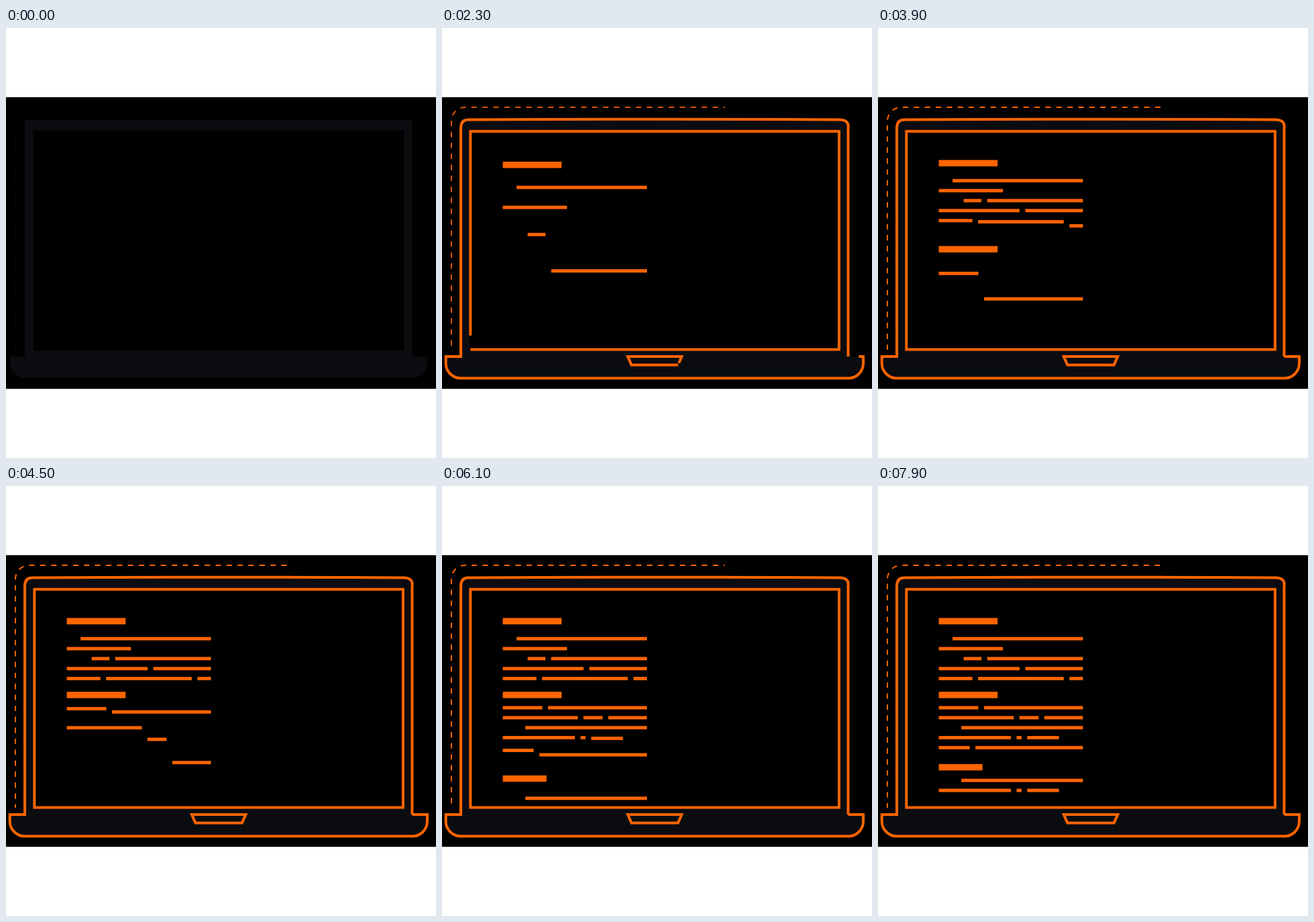
Write an HTML page that moves like this. It is 640x640 px and loops after 8 s.

```html
<!DOCTYPE html>
<html lang="en">
<head>
<meta charset="utf-8">
<title>Laptop line drawing</title>
<style>
  html, body { margin: 0; height: 100%; overflow: hidden; background: #fff; }
  svg { display: block; width: 100vw; height: 100vh; }
  .line { fill: none; stroke: #ff6400; stroke-width: 4; }
  #dashes { stroke-width: 2; stroke-dasharray: 8.16; }
  #bars { fill: #ff6400; }
  .panel { fill: #0b0c10; }
</style>
</head>
<body>
<svg viewBox="0 0 640 640">
  <clipPath id="screen"><rect x="41" y="152.5" width="551" height="327"/></clipPath>
  <rect y="103" width="640" height="434"/>
  <path id="dashes" class="line" d="M421.2 118H34.5A20.5 20.5 0 0 0 14 138.5V479"/>
  <path class="panel" d="M28 136.5H604.5V489H627V499A22 22 0 0 1 605 521H28A22 22 0 0 1 6 499V489H28Z"/>
  <rect x="41" y="152.5" width="551" height="327"/>
  <g id="bars" clip-path="url(#screen)"></g>
  <path class="line trim" data-start="647" pathLength="1"
    d="M604.5 489V149Q606.5 137 592 136.5Q320 134.8 39 136.5Q28 136.5 28 149V489H5.7V499A22.3 22.3 0 0 0 28 521.3H605A22 22.3 0 0 0 627 499V489H604.5"/>
  <path class="line trim" data-start="721" pathLength="1" d="M42.3 478.5H591V153.8H42.3Z"/>
  <path class="line trim" data-start="792" pathLength="1" d="M351.3 501.5H282L276.5 489H356.8Z"/>
</svg>
<script>
const LOOP = 8000, STEP = 100, FRAME = 40;
const DRAW_TIME = 2070;
const BAR_START = 1346, BAR_STAGGER = 200, BAR_TIME = 1190, BAR_FROM = 500;
const DASH_PERIOD = 16.32, DASH_CYCLE = 3850;
const LEFT = 90.5, RIGHT = 305, WORD_GAP = 8.5, LINE_PITCH = 14.85;

const group = document.getElementById('bars');
const dashes = document.getElementById('dashes');
const trims = [...document.querySelectorAll('.trim')];
const bars = [];
let lineY = 0;

function addBar(x, y, width, height) {
  const node = document.createElementNS('http://www.w3.org/2000/svg', 'rect');
  node.setAttribute('x', x);
  node.setAttribute('width', width);
  node.setAttribute('height', height);
  group.append(node);
  bars.push({ node, y, height });
}

function heading(y, width, firstLineY) {
  addBar(LEFT, y, width, 9.5);
  lineY = firstLineY;
}

// Sets words from the left; returns where the next word would begin.
function setWords(x, words) {
  for (const width of words) {
    addBar(x, lineY, width, 5);
    x += width + WORD_GAP;
  }
  return x;
}

function raggedLine(...words) {
  setWords(LEFT, words);
  lineY += LINE_PITCH;
}

// The last word reaches the right margin.
function fullLine(indent, ...words) {
  const x = setWords(LEFT + indent, words);
  setWords(x, [RIGHT - x]);
  lineY += LINE_PITCH;
}

function closingLines() {
  fullLine(33.5);
  raggedLine(107.3, 7.3, 47.2);
}

heading(201.2, 87.5, 227.2);
fullLine(20.5);
raggedLine(95.5);
fullLine(37, 26.5);
fullLine(0, 120.2);
fullLine(0, 50, 127.5);

heading(311, 87.5, 330);
fullLine(0, 58.8);
fullLine(0, 111.5, 28.5);
closingLines();
fullLine(0, 46);

heading(418.6, 65, 438.2);
closingLines();

const clamp = u => Math.min(1, Math.max(0, u));

// Share of the way still to go on cubic-bezier(0, 1, 0.72, 1).
function remaining(time, start, duration) {
  const left = 1 - clamp((time - start) / duration);
  if (left === 0 || left === 1) return left;
  let low = 0, high = 1;
  for (let i = 0; i < 24; i++) {
    const w = (low + high) / 2, s = 1 - w;
    if (w ** 3 + 3 * w * w * s + 0.84 * w * s * s < left) low = w;
    else high = w;
  }
  return high ** 3;
}

function draw(t) {
  const fade = clamp(t / 3000);
  dashes.style.opacity = Math.max(0.06, fade * fade * (3 - 2 * fade));
  dashes.style.strokeDashoffset = -(0.6 + t / DASH_CYCLE * DASH_PERIOD);

  for (const line of trims) {
    const drawn = 1 - remaining(t, +line.dataset.start, DRAW_TIME);
    line.style.visibility = drawn > 0 ? 'visible' : 'hidden';
    line.style.strokeDasharray = drawn < 1 ? `${drawn} 2` : 'none';
  }

  bars.forEach(({ node, y, height }, i) => {
    const r = remaining(t, BAR_START + i * BAR_STAGGER, BAR_TIME);
    node.setAttribute('y', y + (BAR_FROM - y) * r - height / 2);
  });
}

// The drawing runs at 25 frames per second and is shown every 100 ms.
function tick() {
  const shown = Math.floor(performance.now() % LOOP / STEP) * STEP;
  draw(shown < 300 ? 0 : Math.floor(shown / FRAME) * FRAME);
  requestAnimationFrame(tick);
}
tick();
</script>
</body>
</html>
```
